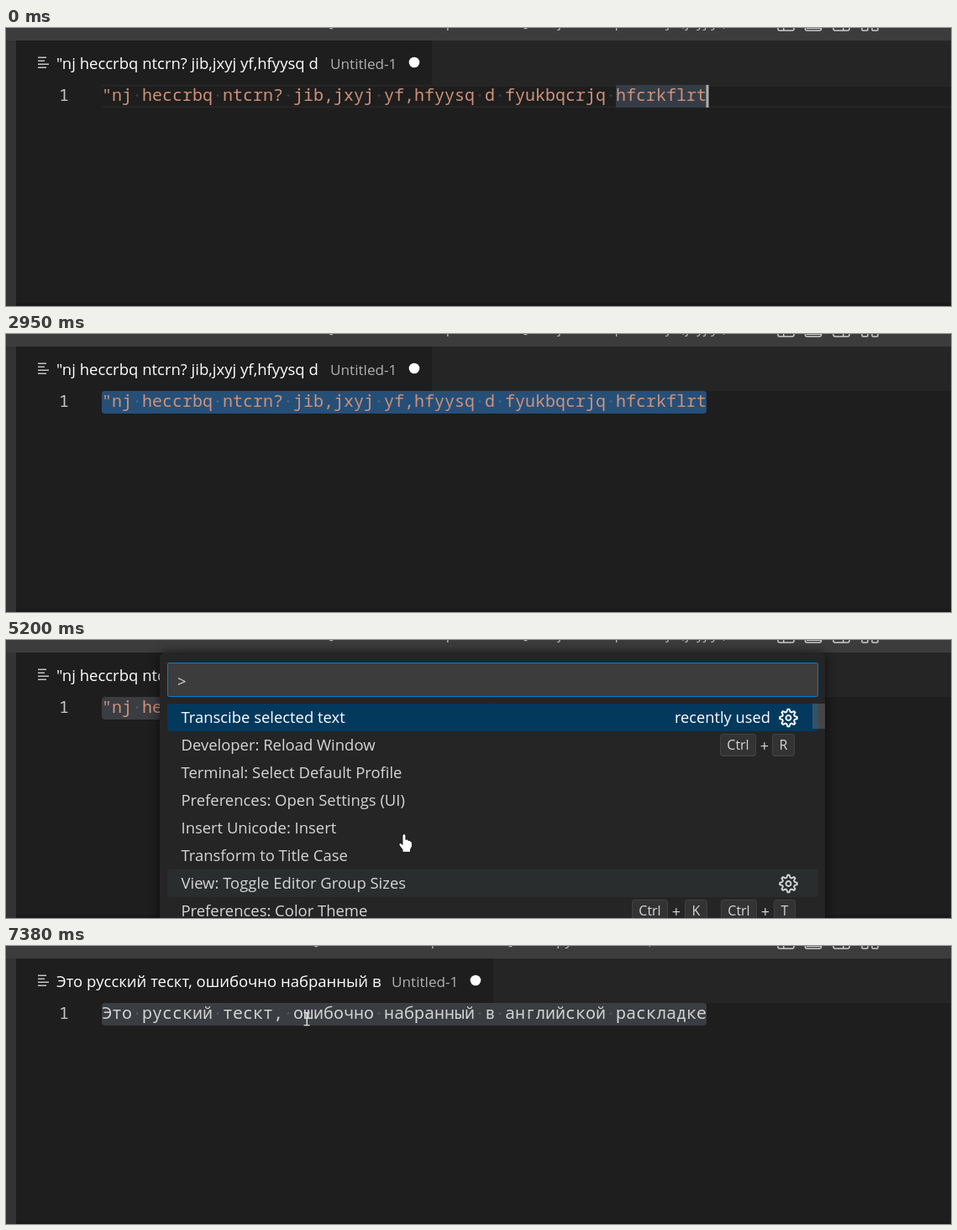
Animation, 1125 px wide and 332 px high, one loop 7.45 s. Source, as an HTML page with a canvas:

```html
<!DOCTYPE html>
<html lang="en">
<head>
<meta charset="utf-8">
<title>Layout transcription</title>
<style>
html, body { margin: 0; width: 100%; height: 100%; overflow: hidden; background: #1e1e1e; }
canvas { display: block; }
</style>
</head>
<body>
<canvas id="stage" width="1125" height="332"></canvas>
<script>
const ctx = document.getElementById('stage').getContext('2d');
const LOOP = 7450, CHAR = 12, LEFT = 114, SOFT = '#d6d6d6';
const LATIN = '"nj heccrbq ntcrn? jib,jxyj yf,hfyysq d fyukbqcrjq hfcrkflrt';
const RUSSIAN = 'Это русский тескт, ошибочно набранный в английской раскладке';
const OPEN = 3420, PRESS = 6560, FOCUS = 6630, CLOSE = 6910, RENAME = 6980;

// [time, caret column] for each word-wise jump to the left
const JUMPS = [[0, 60], [70, 51], [270, 40], [480, 38], [680, 31], [820, 28], [1020, 23],
  [1220, 19], [1420, 12], [1620, 4], [1950, 1], [2350, 0]];
// [time, x, y] of the pointer
const MOUSE = [[4980, 478, 335], [5200, 474, 232], [5410, 462, 106], [5550, 452, 90], [6230, 358, 86]];

const ROWS = [
  ['Transcibe selected text'],
  ['Developer: Reload Window', [[850, 'Ctrl'], [912, 'R']]],
  ['Terminal: Select Default Profile'],
  ['Preferences: Open Settings (UI)'],
  ['Insert Unicode: Insert'],
  ['Transform to Title Case'],
  ['View: Toggle Editor Group Sizes'],
  ['Preferences: Color Theme', [[745, 'Ctrl'], [808, 'K'], [851, 'Ctrl'], [914, 'T']]]
];

const HAND = new Path2D('M-2 1.5Q0-1.5 2 1.5V7Q4 5.500 5 8Q7 7 7.500 9Q10 9 9.500 12V15L7.500 19V22H-2V19L-6 13.500Q-6.500 10.500-4 11L-2 13Z');
const GEAR = new Path2D();
for (let i = 0; i < 32; i++) {
  const a = (i - 0.5) * Math.PI / 16, r = i % 4 < 2 ? 10.3 : 7.5;
  GEAR.lineTo(r * Math.cos(a), r * Math.sin(a));
}
GEAR.closePath();
GEAR.moveTo(3, 0);
GEAR.arc(0, 0, 3, 0, 7);

function rect(x, y, w, h, color, radius = 0) {
  ctx.fillStyle = color;
  ctx.beginPath();
  ctx.roundRect(x, y, w, h, radius);
  ctx.fill();
}

function frame(x, y, w, h, color, radius = 0, line = 1) {
  ctx.strokeStyle = color;
  ctx.lineWidth = line;
  ctx.beginPath();
  ctx.roundRect(x, y, w, h, radius);
  ctx.stroke();
}

function dot(x, y, r, color) {
  ctx.fillStyle = color;
  ctx.beginPath();
  ctx.arc(x, y, r, 0, 7);
  ctx.fill();
}

function text(s, x, y, color, size = 18.45, family = '"Open Sans", sans-serif') {
  ctx.font = `${size}px ${family}`;
  ctx.fillStyle = color;
  ctx.fillText(s, x, y);
}

const mono = (s, x, color) => text(s, x, 87, color, 20, '"Noto Sans Mono", monospace');

function shape(path, x, y, fill, stroke, width) {
  ctx.save();
  ctx.translate(x, y);
  ctx.lineWidth = width;
  ctx.strokeStyle = stroke;
  if (fill) {
    ctx.fillStyle = fill;
    ctx.fill(path);
  }
  ctx.stroke(path);
  ctx.restore();
}

function mouseAt(t) {
  if (t < MOUSE[0][0]) return null;
  const i = MOUSE.findIndex(k => k[0] > t);
  if (i < 0) return MOUSE[MOUSE.length - 1].slice(1);
  const [t0, x0, y0] = MOUSE[i - 1], [t1, x1, y1] = MOUSE[i];
  const p = (t - t0) / (t1 - t0);
  return [x0 + (x1 - x0) * p, y0 + (y1 - y0) * p];
}

function drawTitleBar(done) {
  rect(0, 0, 1125, 15, '#3c3c3c');
  const name = done ? 'Это русский тескт, ошибочно н' : '"nj heccrbq ntcrn? jib,jxyj yf,';
  text('[Extension Development Host] ● ' + name, done ? 366 : 384, -1, '#bbb', 16.8);
  for (const x of [919, 951.5, 985]) frame(x, -12, 19, 15, '#ccc', 2, 1.5);
  rect(925, 0, 1.5, 3, '#ccc');
  rect(953, -1, 17, 2, '#ccc');
  rect(996, 0, 1.5, 3, '#ccc');
  frame(1019, -4, 7, 7, '#ccc', 1, 1.5);
  frame(1031, -4, 7, 7, '#ccc', 1, 1.5);
}

function drawTab(done) {
  rect(12, 15, 1113, 53, '#252526');
  rect(12, 15, done ? 568 : 495, 53, '#1e1e1e');
  [10, 8, 13, 10].forEach((w, i) => rect(38, 34.5 + i * 4, w, 1.5, '#c5c5c5'));
  text((done ? RUSSIAN : LATIN).slice(0, 39), 60, 49, '#fff', 18.52);
  text('Untitled-1', done ? 459 : 386, 49, '#b0b0b0', 17.2);
  dot(done ? 559 : 486, 41, 6.3, '#fff');
}

function drawEditor(t) {
  const done = t >= CLOSE;
  const i = JUMPS.findLastIndex(j => j[0] <= t);
  const [since, column] = JUMPS[i];
  if (i === 0) {
    rect(LEFT, 68, 1011, 1.5, '#282828');
    rect(LEFT, 93.5, 1011, 1.5, '#282828');
    rect(LEFT + 51 * CHAR, 68, 9 * CHAR, 27, '#343d47');
  } else {
    rect(LEFT + column * CHAR, 68, (60 - column) * CHAR, 27, t < OPEN ? '#264f78' : '#3a3d41', 4);
  }
  mono('1', 63, '#c6c6c6');
  const line = done ? RUSSIAN : LATIN;
  mono(line, LEFT, done ? '#d4d4d4' : '#ce9178');
  [...line].forEach((c, k) => {
    if (c === ' ') dot(LEFT + (k + 0.5) * CHAR, 80.5, 1.5, 'rgba(227,228,226,.15)');
  });
  // The caret glides: it is halfway just after each jump
  const caret = i && t - since < 70 ? (column + JUMPS[i - 1][1]) / 2 : column;
  if (t < 2950 || (t >= OPEN && t < 3560)) rect(LEFT - 0.5 + caret * CHAR, 68, 3, 27, '#aeafad');
}

function drawKeys(keys, y, shift) {
  ctx.textAlign = 'center';
  keys.forEach(([x, label], k) => {
    ctx.font = '16px "Open Sans", sans-serif';
    const left = x + shift, w = Math.round(ctx.measureText(label).width) + 17;
    rect(left, y - 14, w, 27, '#424242', 4);
    rect(left + 1, y - 13, w - 2, 24.5, '#333334', 3);
    text(label, left + w / 2, y + 5, SOFT, 16);
    if (k % 2 === 0) text('+', left + 53, y + 7, SOFT, 18);
  });
  ctx.textAlign = 'left';
}

function drawPalette(t) {
  const focused = t >= FOCUS;
  ctx.save();
  ctx.shadowColor = 'rgba(0,0,0,.6)';
  ctx.shadowBlur = 14;
  rect(183, 15, 792, 330, '#252526', 6);
  ctx.restore();

  rect(192, 27, 775, 41, '#3c3c3c', 2);
  if (!focused) frame(192.5, 27.5, 774, 40, '#007fd4', 2);
  text('>', 204, 56, SOFT);
  if (!focused && (t < 4030 || (t - 3500) % 1060 < 530)) rect(216, 35, 1, 26, '#ccc');

  // Hover follows the pointer with a short delay
  const late = mouseAt(t - 120);
  const hover = late ? Math.floor((late[1] - 76) / 33) : -1;
  ROWS.forEach(([label, keys], i) => {
    const top = 76 + i * 33, mid = top + 17, first = i === 0;
    const color = first ? '#fff' : SOFT;
    if (first || hover === i) rect(192, top, 775, 33, first ? '#04395e' : '#2a2d2e', 4);
    if (first && focused) frame(192.5, top + 0.5, 774, 32, '#007fd4', 4);
    text(label, 208.5, mid + 6, color);
    if (first) text('recently used', 796, mid + 6, color, 18.3);
    if (first || hover === i) shape(GEAR, 931.5, mid, null, color, 1.9);
    if (keys) drawKeys(keys, mid, hover === i ? -30 : 0);
  });

  const bar = t < 3560 ? 0 : t < 4310 ? 1 : t < 4580 ? 0.5 : t < 4980 ? 0 : 1;
  rect(960, 76, 15, 30, `rgba(121,121,121,${0.4 * bar})`);
}

function drawPointer(t) {
  const at = mouseAt(t);
  if (!at) return;
  if (t < RENAME) {
    shape(HAND, ...at, '#fff', '#111', 1);
    if (t >= PRESS && t < CLOSE) {
      dot(355, 87, 15, `rgba(222,208,40,${Math.min(0.78, 0.3 + (t - PRESS) / 200)})`);
    }
  } else if (t >= 7380) {
    rect(357.5, 80, 1.5, 14, '#ddd');
    rect(354.5, 79, 7, 1.3, '#ddd');
    rect(354.5, 94, 7, 1.3, '#ddd');
  }
}

function draw(t) {
  rect(0, 0, 1125, 332, '#1e1e1e');
  drawTitleBar(t >= RENAME);
  drawTab(t >= RENAME);
  rect(0, 15, 12, 317, '#333');
  drawEditor(t);
  rect(12, 328, 1113, 4, '#1a1a1a');
  if (t >= OPEN && t < CLOSE) drawPalette(t);
  drawPointer(t);
}

function tick() {
  draw(performance.now() % LOOP);
  requestAnimationFrame(tick);
}
tick();
</script>
</body>
</html>
```
